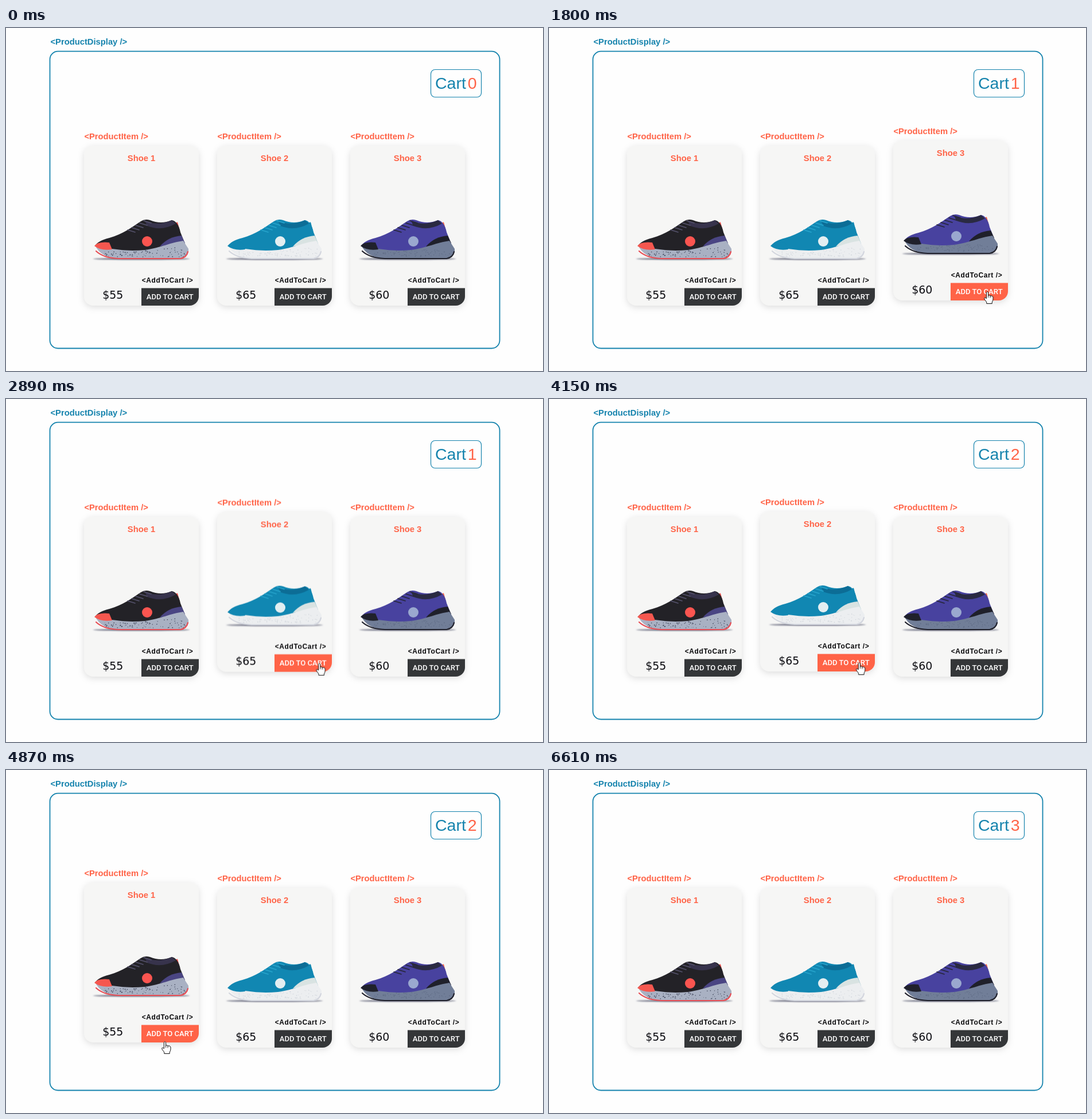
An HTML page that plays this animation: 936x598 px, repeating every 7680 ms.

```html
<!DOCTYPE html>
<html lang="en">
<head>
<meta charset="utf-8">
<title>Product display</title>
<style>
  html, body { margin: 0; width: 100%; height: 100%; overflow: hidden; background: #fefefe; }
  svg { display: block; width: 936px; height: 598px; }
  text { font-family: "Liberation Sans", Arial, sans-serif; }
  .label { font-size: 14.75px; font-weight: 700; fill: #ff6347; }
  .mid { text-anchor: middle; }
  .label.blue, .blue { fill: #1583ad; }
  .cart { font-size: 28.5px; }
  .count { fill: #ff6347; }
  .tag { font-size: 12px; font-weight: 700; letter-spacing: .6px; fill: #0b0b0d; }
  .price { font: 18.9px "DejaVu Sans", sans-serif; fill: #0d0d12; }
  .buy { font: 500 13.1px Roboto, sans-serif; fill: #fff; text-anchor: middle; }
  .panel { fill: #f6f6f5; filter: drop-shadow(0 3px 6px rgba(0, 0, 0, .13)); }
  .frame { fill: none; stroke: #1583ad; }
  .pointer path { fill: #fff; stroke: #111; stroke-linejoin: round; }
  .line { fill: none; stroke-linecap: round; }
</style>
</head>
<body>
<svg viewBox="0 0 936 598">
  <defs>
    <filter id="soft" x="-10%" width="120%" y="-200%" height="500%"><feGaussianBlur stdDeviation="1.2"/></filter>
  </defs>
  <text class="label blue" x="77.5" y="29">&lt;ProductDisplay /&gt;</text>
  <rect class="frame" x="76.5" y="40.7" width="784" height="517.8" rx="14" stroke-width="1.8"/>
  <rect class="frame" x="740.5" y="72.5" width="88" height="48" rx="7.5" stroke-width="1.2"/>
  <text class="cart blue" x="748" y="106">Cart</text>
  <g id="counts"></g>
  <g id="cards"></g>
  <g class="pointer" id="pointer">
    <path id="arrow" d="M0 .5V15.8L3.6 12.5 6 17.8 8.3 16.8 6 11.6H10.8Z"/>
    <g id="hand">
      <path d="M-1.6 2Q0-1 1.6 2V7.3Q4 6 5 8 9 7 10 10V14Q9.7 17 8.2 19V21.5H-1.2V19L-5 14Q-6 9-1.6 12.6Z"/>
      <path d="M1.6 7V11M5 8V11.5" stroke-width=".9"/>
    </g>
  </g>
</svg>
<script>
const LOOP = 7680;
const $ = id => document.getElementById(id);
const range = n => [...Array(n).keys()];

let seed = 11;
const rnd = () => (seed = seed * 16807 % 2147483647) / 2147483647;

const path = (fill, d) => `<path fill="${fill}" d="${d}"/>`;
const line = (color, width, d) => `<path class="line" stroke="${color}" stroke-width="${width}" d="${d}"/>`;
const dot = (fill, x, y, r) => `<circle cx="${x}" cy="${y}" r="${r}" fill="${fill}"/>`;

const items = [
  { price: 55, upper: '#232227', lining: '#37334c', lace: '#55526c', toe: '#f5574f', heel: '#4a4583',
    sole: '#a9b1c3', grip: '#e84e55', tab: '#f0524d', mark: '#fb5550', speck: '#3a4055' },
  { price: 65, upper: '#1187b2', lining: '#0c6d96', lace: '#27a5cd', toe: '#1187b2', heel: '#d9e3e2',
    sole: '#eceef0', grip: '#d3d6de', tab: '#1187b2', mark: '#e3eef1', speck: '#cfd4da' },
  { price: 60, upper: '#48429f', lining: '#2a2a42', lace: '#252536', toe: '#20212c', heel: '#1f202a',
    sole: '#717e98', grip: '#20212c', tab: '#ff6a48', mark: '#9aa8cf', speck: '#5d6983' }
];

// every shoe shares one cut and differs in its colours
function shoe(c) {
  const laces = range(5).map(i => `M${76 + i * 7} ${352 - i * 4}l13 4`).join('');
  const specks = range(90).map(() => {
    const u = rnd(), top = 390 - 9 * u * u;
    return dot(c.speck, 36 + u * 140, top + rnd() * (399 - top), .4 + rnd() * .5);
  }).join('');
  return '<ellipse cx="100" cy="402.5" rx="84" ry="1.8" fill="#6b6d80" filter="url(#soft)"/>' +
    line(c.tab, 3, 'M162 340L166 356') +
    path(c.upper, 'M19 380Q24 371 44 366C68 359 84 347 99 337Q106 332 115 335 134 343 153 335 164 337 168 356L176 376 106 390 40 389Z') +
    path(c.lining, 'M106 336Q128 346 153 335L160 341Q135 355 110 345Z') +
    line(c.lace, 1.6, laces) +
    path(c.heel, 'M132 381Q146 364 170 362L176 375Z') +
    path(c.sole, 'M19 378Q60 391 106 387C135 383 150 374 173 371L182 385Q184 395 172 402H60Q28 400 19 378Z') +
    specks +
    line(c.grip, 2.2, 'M21 389Q34 401 60 402H168Q179 400 181 390') +
    path(c.toe, 'M18 380Q24 372 44 374L49 386Q30 389 18 380Z') +
    dot(c.mark, 110, 372, 9);
}

$('cards').innerHTML = items.map((item, i) => `
  <g transform="translate(${136 + 232 * i} 0)"><g id="card${i}">
    <text class="label" x=".4" y="194">&lt;ProductItem /&gt;</text>
    <rect class="panel" y="205" width="200" height="279" rx="16"/>
    <text class="label mid" x="100" y="232">Shoe ${i + 1}</text>
    ${shoe(item)}
    <text class="tag" x="100.7" y="444">&lt;AddToCart /&gt;</text>
    <text class="price" x="32.2" y="471.6">$${item.price}</text>
    <path id="btn${i}" d="M100 453.5H200V468A16 16 0 0 1 184 484H100Z"/>
    <text class="buy" x="149.7" y="473">ADD TO CART</text>
  </g></g>`).join('');

$('counts').innerHTML = range(4).map(n =>
  `<text class="cart count" id="n${n}" x="804.8" y="106">${n}</text>`).join('');

// steps: [ms, declaration]
let css = '';
function anim(id, steps, easing) {
  const all = [[0, steps[0][1]], ...steps, [LOOP, steps[steps.length - 1][1]]];
  css += `@keyframes ${id}{` + all.map(([t, rule]) => `${t / LOOP * 100}%{${rule}}`).join('') +
    `}#${id}{animation:${id} ${LOOP}ms ${easing} infinite}`;
}
const pulse = (id, [on, off], time, rest, active) =>
  anim(id, [[on, rest], [on + time, active], [off, active], [off + time, rest]], 'ease');
const toggle = (id, first, times) =>
  anim(id, [[0, `opacity:${+first}`], ...times.map((t, i) => [t, `opacity:${+(first === !!(i % 2))}`])], 'step-end');
const at = (x, y) => `transform:translate(${x}px,${y}px)`;

const visits = [
  { card: 2, hover: [722, 2627], press: [742, 2450], click: 1800 },
  { card: 1, hover: [2685, 4190], press: [2700, 4190], click: 3630 },
  { card: 0, hover: [4470, 6330], press: [4450, 6330], click: 5950 }
];
for (const { card, hover, press } of visits) {
  pulse('card' + card, hover, 300, at(0, 0), at(0, -9));
  pulse('btn' + card, press, 200, 'fill:#343638', 'fill:#ff6347');
}

const clicks = visits.map(v => v.click);
range(4).forEach(n => toggle('n' + n, n === 0, clicks.slice(Math.max(0, n - 1), n + 1)));

// pointer moves: start, end, x, y
const moves = [
  [310, 840, 771, 472], [840, 1020, 768, 465], [1120, 1330, 764, 459],
  [2340, 2660, 579, 469], [2660, 2980, 542, 459],
  [4150, 4520, 281, 480], [4520, 4870, 277, 473],
  [6330, 6520, 709, 599]
];
let spot = at(882, 598);
anim('pointer', moves.flatMap(([start, end, x, y]) => {
  const from = spot;
  spot = at(x, y);
  return [[start, from], [end, spot]];
}), 'ease-out');

// the hand appears shortly after the pointer reaches a button
const grabs = visits.flatMap(({ press: [on, off] }) => [on + 80, off]);
toggle('hand', false, grabs);
toggle('arrow', false, [moves[0][0], ...grabs, 6520]);

document.head.appendChild(document.createElement('style')).textContent = css;
</script>
</body>
</html>
```
